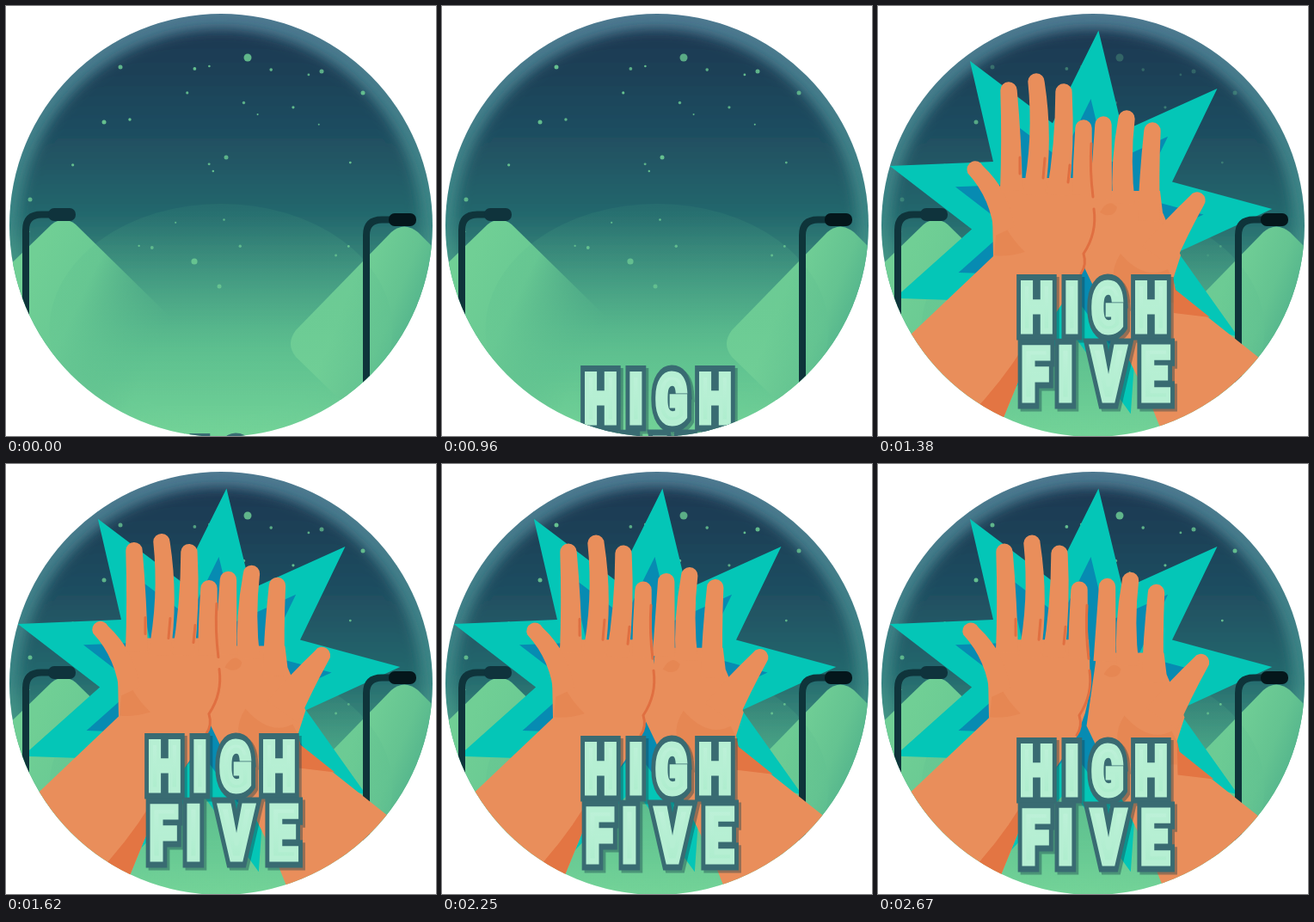
An HTML page that plays this animation: 500x500 px, repeating every 2.7 s.

```html
<!DOCTYPE html>
<html lang="en">
<head>
<meta charset="utf-8">
<title>High five</title>
<style>
html, body { margin: 0; width: 100%; height: 100%; overflow: hidden; background: #fff; }
svg { display: block; width: 100vw; height: 100vh; }
text { font-family: Roboto, Inter, sans-serif; font-weight: 900; text-anchor: middle; vector-effect: non-scaling-stroke; stroke-miterlimit: 3; }
.skin { fill: #e98e5b; }
.shade { fill: #e37543; }
.soft { fill: #e4824f; opacity: .6; }
.crease { fill: none; stroke: #e06f41; stroke-width: 3; stroke-linecap: round; }
</style>
</head>
<body>
<svg viewBox="0 0 500 500">
  <defs>
    <clipPath id="disc"><circle cx="250" cy="255" r="246"/></clipPath>
    <filter id="blur"><feGaussianBlur stdDeviation="7"/></filter>
    <linearGradient id="rim" gradientUnits="userSpaceOnUse" x1="0" y1="9" x2="0" y2="500">
      <stop offset="0" stop-color="#4d7890"/>
      <stop offset=".5" stop-color="#3b8684"/>
      <stop offset=".75" stop-color="#56b68b"/>
      <stop offset="1" stop-color="#74d498"/>
    </linearGradient>
    <linearGradient id="sky" gradientUnits="userSpaceOnUse" x1="0" y1="9" x2="0" y2="500">
      <stop offset="0" stop-color="#19344e"/>
      <stop offset=".28" stop-color="#1f4d60"/>
      <stop offset=".48" stop-color="#24686d"/>
      <stop offset=".65" stop-color="#419881"/>
      <stop offset=".8" stop-color="#5bbe8e"/>
      <stop offset="1" stop-color="#74d498"/>
    </linearGradient>
    <linearGradient id="leftHill" gradientUnits="userSpaceOnUse" x1="30" y1="300" x2="185" y2="375">
      <stop offset="0" stop-color="#70cf95"/>
      <stop offset=".4" stop-color="#69c993"/>
      <stop offset="1" stop-color="#58b98c" stop-opacity="0"/>
    </linearGradient>
    <linearGradient id="rightHill" gradientUnits="userSpaceOnUse" x1="400" y1="330" x2="500" y2="370">
      <stop offset="0" stop-color="#71cf96"/>
      <stop offset=".5" stop-color="#64c391"/>
      <stop offset="1" stop-color="#48ab89"/>
    </linearGradient>
    <linearGradient id="mist" x1="0" y1="0" x2="0" y2="1">
      <stop offset="0" stop-color="#4fae88" stop-opacity=".1"/>
      <stop offset=".5" stop-color="#62c491" stop-opacity=".3"/>
      <stop offset="1" stop-color="#70d097" stop-opacity="0"/>
    </linearGradient>
    <linearGradient id="pale" x1="0" y1="0" x2="0" y2="1">
      <stop offset="0" stop-color="#c2f2dc"/>
      <stop offset="1" stop-color="#a9ecca"/>
    </linearGradient>
  </defs>

  <g clip-path="url(#disc)">
    <rect width="500" height="500" fill="url(#rim)"/>
    <circle cx="249" cy="261" r="234" fill="url(#sky)" filter="url(#blur)"/>
    <path d="M-40 344L53 254Q67 243 81 254L230 400L150 520H-40Z" fill="url(#leftHill)"/>
    <path d="M448 263Q463 250 479 263L560 344L470 537L337 408Q325 393 337 377Z" fill="url(#rightHill)"/>
    <ellipse cx="250" cy="376" rx="199.5" ry="146" fill="url(#mist)"/>
    <g id="stars" fill="#68c491"/>
  </g>

  <g id="burst"/>

  <g clip-path="url(#disc)">
    <g id="lamps"/>
    <g id="right">
      <path class="skin" d="M250 215H328L331 240L352 290L343 318L346 332L520 470L360 570L318 465L262 350L238 300Z"/>
      <path class="shade" d="M343 316L346 330L386 362L344 357Z"/>
      <path class="soft" d="M282 288Q310 320 337 306L343 318L344 345H290Q262 318 282 288Z"/>
    </g>
    <g id="left">
      <path class="skin" d="M-60 475L134 291L133 240L145 200H250Q254 255 246 285L236 313Q205 360 178 400L147 476L90 570Z"/>
      <path class="shade" d="M170 395L178 400L147 476L135 505L105 478Q145 436 170 395Z"/>
      <path class="soft" d="M140 233Q146 262 171 286Q151 292 135 290Z"/>
      <path class="crease" d="M251 236Q255 264 239 288Q243 301 236 311"/>
    </g>
    <g id="title"/>
  </g>
</svg>

<script>
const LOOP = 2700;
const $ = id => document.getElementById(id);

function add(parent, tag, attrs, content) {
  const el = document.createElementNS("http://www.w3.org/2000/svg", tag);
  for (const k in attrs) el.setAttribute(k, attrs[k]);
  if (content) el.textContent = content;
  return parent.appendChild(el);
}

let seed = 11;
const random = () => (seed = seed * 16807 % 2147483647) / 2147483647;

// A few large stars, the rest scattered
const stars = [];
const star = (cx, cy, r) => stars.push(add($("stars"), "circle", { cx, cy, r }));
star(281, 60, 4.5);
star(219, 297, 3.6);
for (const [x, y] of [[133, 71], [367, 76], [415, 101], [114, 135], [256, 176], [28, 225], [248, 326]]) star(x, y, 2.5);
for (let i = 0; i < 24; i++) {
  const y = 70 + 220 * random();
  const half = Math.sqrt(225 ** 2 - (y - 255) ** 2);
  star(250 + half * (2 * random() - 1), y, 1 + random());
}

function lamp(x, y, post, head) {
  add($("lamps"), "path", { d: `M${x} 500V${y + 18}q0 -18 18 -18h13`, fill: "none", stroke: post, "stroke-width": 8 });
  add($("lamps"), "rect", { x: x + 26, y: y - 7.5, width: 32, height: 15, rx: 7, fill: head });
}
lamp(23, 242.5, "#0f343b", "#0f333c");
lamp(419, 248.5, "#0e343a", "#04161b");

const BURST = { x: 231, y: 255 };
function spiky(outer, inner, fill) {
  const points = [];
  for (let i = -6; i < 12; i++) {
    const a = (-83.6 + i * 19.7) * Math.PI / 180;
    const r = i % 2 ? inner : outer;
    points.push([BURST.x + r * Math.cos(a), BURST.y + r * Math.sin(a)]);
  }
  add($("burst"), "polygon", { points: points.join(" "), fill });
}
spiky(228, 122, "#04c6b7");
spiky(148, 79, "#078bb2");

// Tapered, slightly bent finger with a round tip
function finger(hand, [tx, ty], [bx, by], bend, base = 13, tip = 9.7) {
  const len = Math.hypot(bx - tx, by - ty);
  const nx = (by - ty) / len, ny = (tx - bx) / len;
  const at = (x, y, w) => `${x + nx * w} ${y + ny * w}`;
  const mx = (tx + bx) / 2, my = (ty + by) / 2, mid = (base + tip) / 2;
  add($(hand), "path", {
    class: "skin",
    d: `M${at(bx, by, -base)}Q${at(mx, my, bend - mid)} ${at(tx, ty, -tip)}` +
       `A${tip} ${tip} 0 0 1 ${at(tx, ty, tip)}Q${at(mx, my, bend + mid)} ${at(bx, by, base)}Z`
  });
}
finger("left", [113, 190], [147, 262], 14);
finger("left", [152, 98], [155, 215], 2);
finger("left", [184, 88], [181, 220], 10);
finger("left", [216, 100], [209, 220], 5);
finger("left", [239, 142], [238, 220], -1, 12);
finger("right", [262, 138], [259, 225], 0);
finger("right", [289, 131], [286, 230], -6);
finger("right", [319, 145], [315, 250], -2);
finger("right", [371, 226], [325, 292], -2, 22);

add($("left"), "path", { class: "crease", d: "M223 185L221 205M194 177L192 200M165 176V195M248 160Q246 190 250 222" });
add($("right"), "path", { class: "soft", d: "M258 240Q268 222 278 234Q276 245 264 243Z" });

// Condensed lettering: shadow, outline, face
const NARROW = .7;
function lettering(attrs, shift) {
  const g = add($("title"), "g", { transform: `translate(${shift} ${shift}) scale(${NARROW} 1)`, ...attrs });
  const row = (word, size, y, centres) => add(g, "text", {
    x: centres.map(c => c / NARROW).join(" "), y, "font-size": size
  }, word);
  row("HIGH", 77, 378.5, [184.5, 225.5, 267, 317.5]);
  row("FIVE", 84.5, 458.5, [183, 218, 268, 322]);
}
lettering({ fill: "#173f4b", stroke: "#173f4b", "stroke-width": 18, opacity: .4 }, 3);
lettering({ fill: "#396b72", stroke: "#396b72", "stroke-width": 18 }, 0);
lettering({ fill: "url(#pale)", stroke: "#b6efd3", "stroke-width": 6 }, 0);

// Eased 0 to 1 between two times
function ramp(t, from, to) {
  const p = Math.min(1, Math.max(0, (t - from) / (to - from)));
  return p * p * (3 - 2 * p);
}

const move = (id, x, y) => $(id).setAttribute("transform", `translate(${x} ${y})`);

function draw(t) {
  stars.forEach((el, i) => {
    const dip = i % 6 === 5 ? .2 : .62;
    const at = 1380 + 70 * Math.sin(i * 2.4);
    const glow = .9 + .08 * Math.sin(t / LOOP * Math.PI * 4 + i * 1.7);
    el.setAttribute("opacity", glow - dip * Math.exp(-(((t - at) / 170) ** 2)));
  });

  const away = 335 * (1 - ramp(t, 960, 1095));
  const l = away + 5 * ramp(t, 1380, 1800);
  const r = away - 5 * Math.sin(Math.PI * (t - 1380) / 950);
  move("left", -l, l * .85);
  move("right", r, r);
  for (const id of ["left", "right"]) $(id).style.display = t > 960 ? "" : "none";

  const { x, y } = BURST;
  $("burst").setAttribute("transform", `translate(${x} ${y}) scale(${ramp(t, 1020, 1100)}) translate(${-x} ${-y})`);

  move("title", 0, 190 * (1 - ramp(t, 835, 1110)) + .004 * (t - 1380));
}

const start = performance.now();
function tick() {
  draw((performance.now() - start) % LOOP);
  requestAnimationFrame(tick);
}
tick();
</script>
</body>
</html>
```
